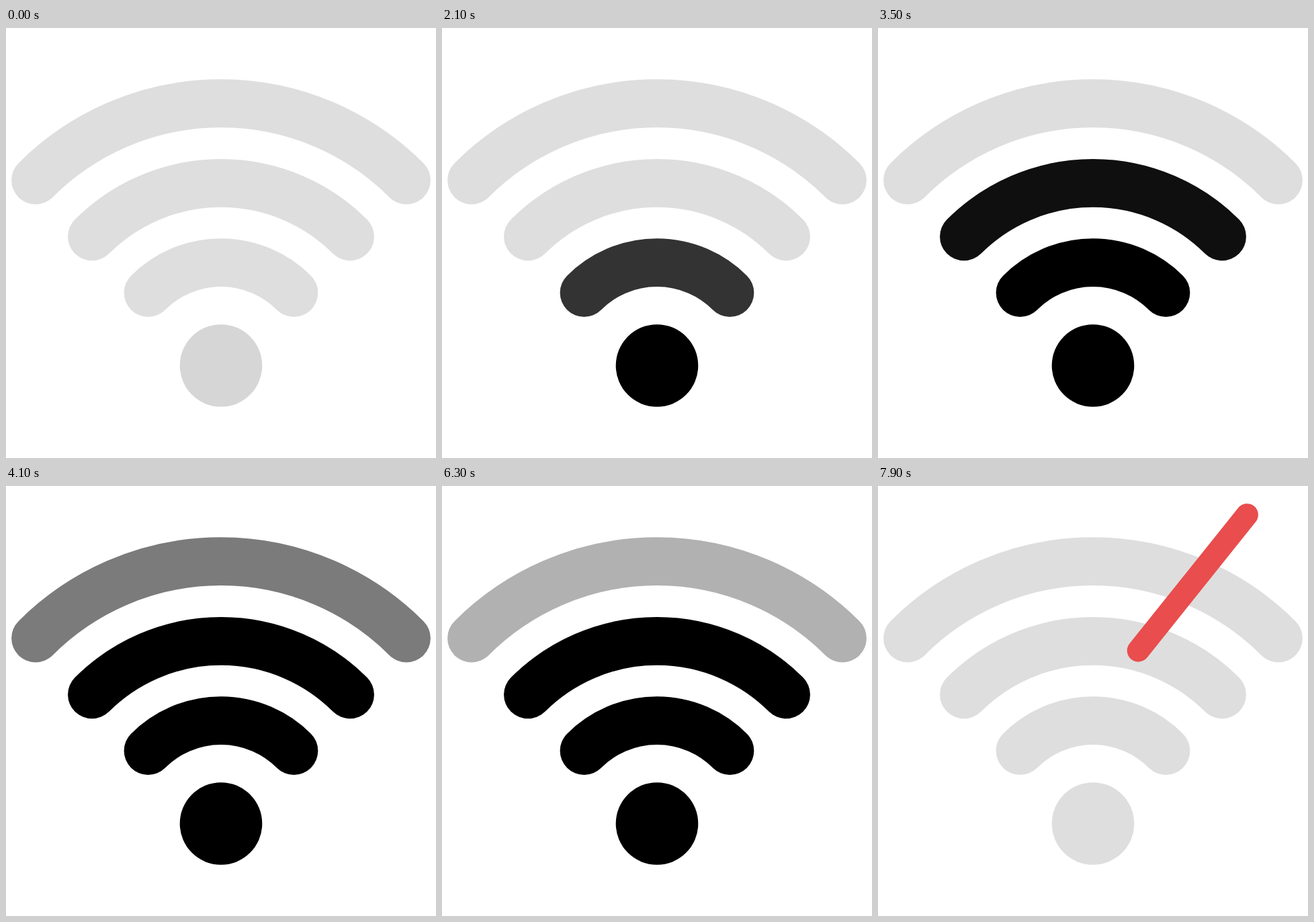
Recreate the animation shown at these times as an HTML page. Size 640x640 px, loop 8000 ms.

```html
<!DOCTYPE html>
<html lang="en">
<head>
<meta charset="utf-8">
<title>Signal</title>
<style>
  html, body { margin: 0; width: 100%; height: 100%; overflow: hidden; background: #fff; }
  svg { display: block; width: 100%; height: 100%; }
</style>
</head>
<body>
<svg id="stage" viewBox="0 0 640 640"></svg>
<script>
const LOOP = 8000, CX = 320, CY = 502.5, GREY = 222;
const RISE = { start: -44, step: 1200, length: 1227 };
const FALL = { start: 5998, step: 381, length: 381 };
const SLASH = { start: 7600, x: 549.2, y: 42.9, dx: -0.625, dy: 0.7806, speed: 0.86 };

const stage = document.getElementById('stage');

function add(tag, attrs) {
  const el = document.createElementNS('http://www.w3.org/2000/svg', tag);
  for (const key in attrs) el.setAttribute(key, attrs[key]);
  return stage.appendChild(el);
}

// A quarter circle around the dot, open at the bottom
function addArc(r) {
  const d = r * Math.SQRT1_2;
  return add('path', {
    d: `M${CX - d} ${CY - d}A${r} ${r} 0 0 1 ${CX + d} ${CY - d}`,
    fill: 'none', 'stroke-width': 71.8, 'stroke-linecap': 'round'
  });
}

const dot = add('circle', { cx: CX, cy: CY, r: 61.3 });
const arcs = [153.4, 271.6, 390.3].map(addArc);
const parts = [dot, ...arcs];
const slash = add('line', {
  x1: SLASH.x, y1: SLASH.y, stroke: '#e94d4d', 'stroke-width': 33.4, 'stroke-linecap': 'round'
});

const progress = (t, phase, i) =>
  Math.min(1, Math.max(0, (t - phase.start - i * phase.step) / phase.length));

function draw(t) {
  parts.forEach((part, i) => {
    const dark = progress(t, RISE, i) - progress(t, FALL, parts.length - 1 - i);
    const v = Math.round(GREY * (1 - dark));
    part.setAttribute(part === dot ? 'fill' : 'stroke', `rgb(${v},${v},${v})`);
  });
  const len = Math.max(0, t - SLASH.start) * SLASH.speed;
  slash.setAttribute('x2', SLASH.x + SLASH.dx * len);
  slash.setAttribute('y2', SLASH.y + SLASH.dy * len);
  slash.setAttribute('visibility', t >= SLASH.start ? 'visible' : 'hidden');
}

const begin = performance.now();
function tick() {
  draw((performance.now() - begin) % LOOP);
  requestAnimationFrame(tick);
}
tick();
</script>
</body>
</html>
```
